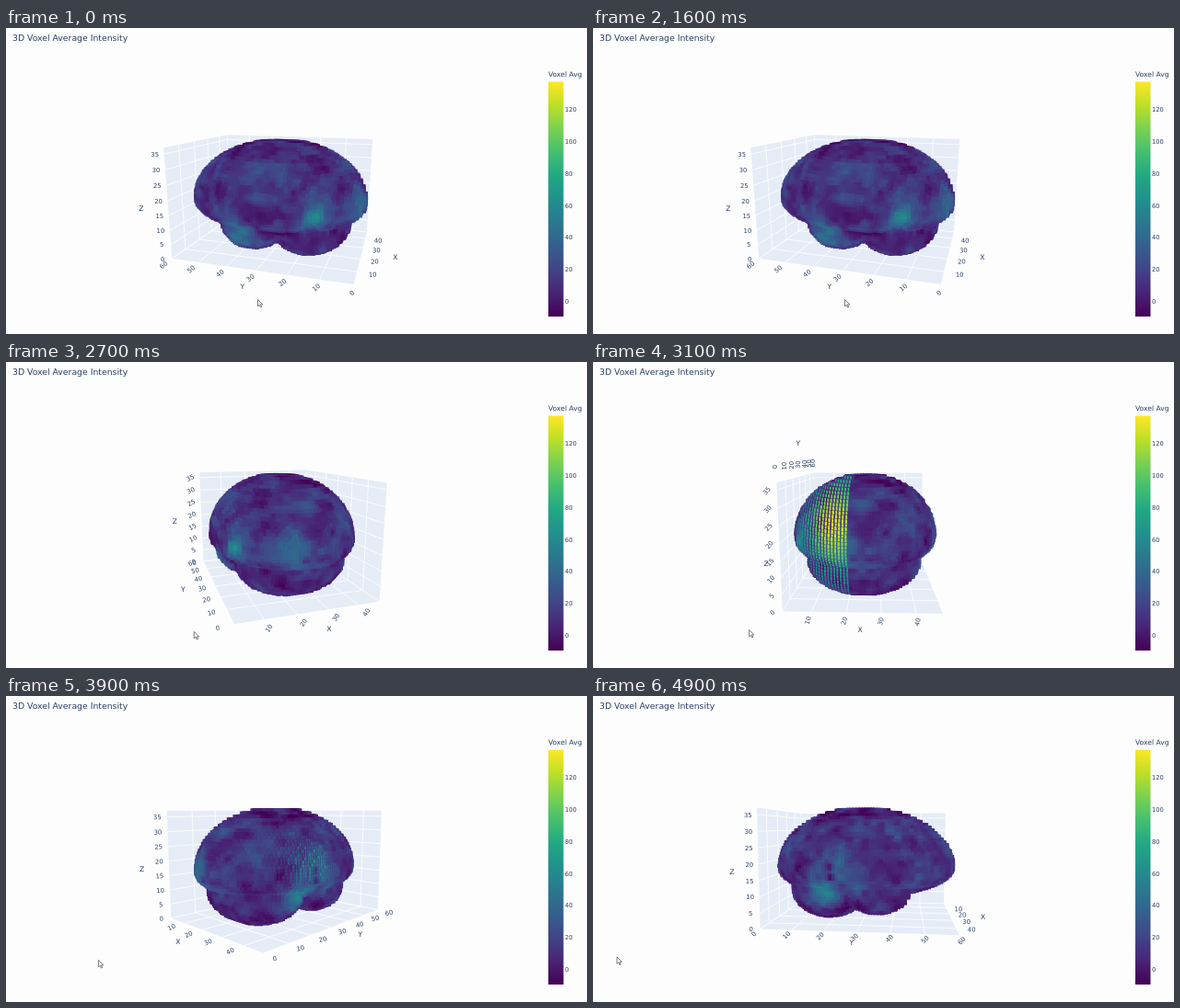
Recreate the animation shown at these times as an HTML page with a canvas. Size 631 px wide and 333 px high, loop 5 s.

```html
<!DOCTYPE html>
<html lang="en">
<head>
<meta charset="utf-8">
<title>3D Voxel Average Intensity</title>
<style>
  html, body { margin: 0; width: 100%; height: 100%; overflow: hidden; background: #fdfdfe; }
  #stage { position: relative; width: 631px; height: 333px; overflow: hidden; }
  canvas, svg { position: absolute; left: 0; top: 0; }
  text { font-family: "DejaVu Sans", Verdana, sans-serif; fill: #2a3f5f; }
</style>
</head>
<body>
<div id="stage">
  <canvas id="scene" width="631" height="333"></canvas>
  <svg width="631" height="333">
    <defs><linearGradient id="scale" x1="0" y1="1" x2="0" y2="0"></linearGradient></defs>
    <text x="7" y="13.8" font-size="9.3">3D Voxel Average Intensity</text>
    <text x="589" y="53.2" font-size="7.6">Voxel Avg</text>
    <rect x="589" y="58.5" width="16.5" height="255.5" fill="url(#scale)"/>
    <g id="ticks" font-size="6.7"></g>
    <path id="cursor" d="M0 0V7.4L1.8 5.8L3 8.5L4.2 8L3 5.4H5.3Z" fill="#fff" stroke="#444" stroke-width=".7"/>
  </svg>
</div>
<script>
const ctx = document.getElementById('scene').getContext('2d');
const cursor = document.getElementById('cursor');
const SVG = 'http://www.w3.org/2000/svg';
const LOOP = 5000, STEP = 100;
const RAD = Math.PI / 180;

const bell = (x, width) => Math.exp(-((x / width) ** 2));
const progress = (t, from, to) => Math.min(1, Math.max(0, (t - from) / (to - from)));

// ---- colour scale ----
const VIRIDIS = ['440154', '482475', '414487', '355f8d', '2a788e', '21918c',
                 '22a884', '44bf70', '7ad151', 'bddf26', 'fde725'];
const rgb = hex => [0, 2, 4].map(i => parseInt(hex.slice(i, i + 2), 16));
const palette = Array.from({ length: 201 }, (_, i) => {
  const p = Math.min(i / 20, 9.999), k = Math.floor(p);
  const a = rgb(VIRIDIS[k]), b = rgb(VIRIDIS[k + 1]);
  return `rgb(${a.map((c, j) => Math.round(c + (b[j] - c) * (p - k)))})`;
});
const LOW = -9.5, HIGH = 137;
const colour = v => palette[Math.round(200 * progress(v, LOW, HIGH))];

function addNode(parent, tag, attrs, content = '') {
  const node = document.createElementNS(SVG, tag);
  for (const key in attrs) node.setAttribute(key, attrs[key]);
  node.textContent = content;
  document.getElementById(parent).append(node);
}
VIRIDIS.forEach((hex, i) => addNode('scale', 'stop', { offset: i / 10, 'stop-color': '#' + hex }));
for (let v = 0; v <= 120; v += 20)
  addNode('ticks', 'text', { x: 607, y: 300 - v * 1.74 }, String(v));

// ---- brain voxels, centred on the axes box ----
const HALF = { x: 23, y: 30, z: 18.5 };
const ball = (dx, dy, dz, rx, ry, rz) => (dx / rx) ** 2 + (dy / ry) ** 2 + (dz / rz) ** 2 <= 1;

const cerebrum = (x, y, z) => z <= 18.5 &&
  ball(x, y + 1.5, z + 1, 23.8, y < -1.5 ? 29 : 32, z < -1 ? 10 : 20.5);
const cerebellum = (x, y, z) => ball(x, y + 12, z + 8, 18, 13.5, 10.5);
const temporalLobes = (x, y, z) => ball(Math.abs(x) - 11, y - 5, z + 7, 10, 11, 8.3);
const inside = (x, y, z) => cerebrum(x, y, z) || cerebellum(x, y, z) || temporalLobes(x, y, z);

function hash(x, y, z) {
  let h = Math.imul(x, 374761393) ^ Math.imul(y, 668265263) ^ Math.imul(z, 1274126177);
  h = Math.imul(h ^ (h >>> 13), 1103515245);
  return ((h ^ (h >>> 16)) >>> 0) / 4294967296;
}
function noise(...point) {
  const cell = point.map(Math.floor);
  const f = point.map((c, i) => { const d = c - cell[i]; return d * d * (3 - 2 * d); });
  let sum = 0;
  for (let n = 0; n < 8; n++) {
    const bit = [n & 1, n >> 1 & 1, n >> 2];
    const weight = bit.reduce((w, b, i) => w * (b ? f[i] : 1 - f[i]), 1);
    sum += weight * hash(...cell.map((c, i) => c + bit[i]));
  }
  return sum;
}

const SPOTS = [
  { x: -20, y: -17, z: -1, r: 4, gain: 48 },
  { x: -6, y: -27, z: 0, r: 4.5, gain: 42 },
  { x: -18, y: 6, z: -8, r: 5, gain: 48 },
  { x: 16, y: -11, z: -8, r: 4.5, gain: 55 },
  { x: 20, y: -8, z: -1, r: 7, gain: 16 },
  { x: 23, y: -8, z: 1, r: 1.2, gain: -40 },
  { x: 23, y: -8, z: -2, r: 1.2, gain: -40 }
];

function intensity(x, y, z) {
  const layer = size => noise(x / size + 40, y / size + 40, z / size + 40);
  let v = -14 + 28 * layer(6) + 24 * layer(2.3);
  if (z < -6) v -= 8;
  for (const s of SPOTS) v += s.gain * bell(Math.hypot(x - s.x, y - s.y, z - s.z), s.r);
  return v - 8 * bell(z - 18, 4);
}

function buildVoxels() {
  const found = [];
  for (let y = -31; y <= 31; y++)
    for (let z = -18.5; z <= 18.5; z++)
      for (let x = -23.5; x <= 23.5; x++) {
        if (!inside(x, y, z)) continue;
        if (inside(x - 1, y, z) && inside(x + 1, y, z) && inside(x, y - 1, z) &&
            inside(x, y + 1, z) && inside(x, y, z - 1) && inside(x, y, z + 1)) continue;
        found.push({ x, y, z, fill: colour(intensity(x, y, z)) });
      }
  return found;
}
const voxels = buildVoxels();

// ---- motion: a steady drag turns the view, then lowers it ----
const FRONT = 91.5;
const viewAngle = t => 17.5 + 168.9 * progress(t, 1680, 4900);
const viewTilt = t => 14.3 - 9 * progress(t, 2300, 4600);
const cursorX = t => 273.5 - 247.5 * progress(t, 1900, 4760);
const cursorY = t => 295.5 - 11.5 * progress(t, 2300, 4600);

const labelTurn = {
  x: angle => -75 * bell(angle - FRONT, 40),
  y: angle => {
    if (Math.abs(angle - 90) < 10) return -90;
    const side = angle % 180;
    return side < 90 ? side / 2 - 48 : 2 * side - 280;
  },
  z: angle => -50 * bell(angle - FRONT, 25)
};

// ---- camera ----
const FOCUS = 406, DISTANCE = 132.6, CX = 296, CY = 182;

function makeCamera(angle, tilt) {
  const s = Math.sin(angle * RAD), c = Math.cos(angle * RAD);
  const st = Math.sin(tilt * RAD), ct = Math.cos(tilt * RAD);
  return p => {
    const near = -c * p.x - s * p.y;
    const scale = FOCUS / (DISTANCE - near * ct - p.z * st);
    return { x: CX + (s * p.x - c * p.y) * scale, y: CY + (near * st - p.z * ct) * scale, scale };
  };
}

// ---- axes ----
const range = (from, to, step) => Array.from({ length: (to - from) / step + 1 }, (_, i) => from + i * step);
const AXES = {
  x: { ticks: range(10, 40, 10), origin: 24.5 },
  y: { ticks: range(0, 60, 10), origin: 30 },
  z: { ticks: range(0, 35, 5), origin: 18.5 }
};

function strokePath(points) {
  ctx.beginPath();
  points.forEach(p => ctx.lineTo(p.x, p.y));
}

function drawWall(project, fixed, at, a, b) {
  const point = (u, v) => project({ [fixed]: at, [a]: u, [b]: v });
  const A = HALF[a], B = HALF[b];
  strokePath([point(-A, -B), point(A, -B), point(A, B), point(-A, B)]);
  ctx.fillStyle = '#e5ecf6';
  ctx.fill();
  ctx.strokeStyle = '#fff';
  ctx.lineWidth = .8;
  for (const t of AXES[a].ticks) {
    const u = t - AXES[a].origin;
    strokePath([point(u, -B), point(u, B)]);
    ctx.stroke();
  }
  for (const t of AXES[b].ticks) {
    const v = t - AXES[b].origin;
    strokePath([point(-A, v), point(A, v)]);
    ctx.stroke();
  }
}

function label(text, x, y, size, turn = 0) {
  ctx.save();
  ctx.translate(x, y);
  ctx.rotate(turn * RAD);
  ctx.font = `${size}px "DejaVu Sans", Verdana, sans-serif`;
  ctx.fillStyle = '#2a3f5f';
  ctx.textAlign = 'center';
  ctx.textBaseline = 'middle';
  ctx.fillText(text, 0, 0);
  ctx.restore();
}

// Labels run along one edge; `place` gives the 3D spot for a value and an outward gap.
function drawAxis(project, angle, name, place, tickShift = [0, 1.5], titleShift = [0, 0]) {
  const { ticks, origin } = AXES[name];
  const turn = labelTurn[name](angle);
  for (const tick of ticks) {
    const p = project(place(tick - origin, 4.6));
    label(tick, p.x + tickShift[0], p.y + tickShift[1], 6.8, turn);
  }
  const p = project(place(0, 11));
  label(name.toUpperCase(), p.x + titleShift[0], p.y + titleShift[1], 7.6);
}

function drawAxes(project, angle) {
  const backX = angle < 90 ? HALF.x : -HALF.x;
  const backY = angle < 180 ? HALF.y : -HALF.y;
  drawWall(project, 'z', -HALF.z, 'x', 'y');
  drawWall(project, 'x', backX, 'y', 'z');
  drawWall(project, 'y', backY, 'x', 'z');

  const outX = -Math.sign(backX), outY = -Math.sign(backY);
  drawAxis(project, angle, 'x', (x, gap) => ({ x, y: -backY + outY * gap, z: -HALF.z }));
  const faceOn = Math.abs(angle - 90) < 10;
  drawAxis(project, angle, 'y', (y, gap) => faceOn
    ? { x: backX, y, z: HALF.z + gap }
    : { x: -backX + outX * gap, y, z: -HALF.z });

  const edges = [{ x: backX, y: -backY }, { x: -backX, y: backY }];
  const [left] = edges.sort((a, b) => project({ ...a, z: 0 }).x - project({ ...b, z: 0 }).x);
  drawAxis(project, angle, 'z', z => ({ ...left, z }), [-10, 1], [faceOn ? -14 : -29, faceOn ? 16 : 4]);
}

// ---- brain ----
// Inner voxels shine through the gaps when the view lines up with the grid.
function shine(p, angle) {
  const front = bell(angle - FRONT, 11), side = bell(angle - 132.5, 16);
  if (front > .03 && p.x < -3.5 && p.y < 2) {
    const core = Math.exp(-((p.x + 8) ** 2) / 75 - ((p.z - 6) ** 2) / 150);
    return { alpha: front, value: 48 + 85 * core };
  }
  if (side > .03 && p.x > 5 && p.y < 12) {
    const core = Math.exp(-((p.y + 8) ** 2) / 100 - ((p.z - 3) ** 2) / 60);
    return { alpha: .8 * side * core, value: 38 + 35 * core };
  }
  return null;
}

function drawBrain(project, angle) {
  const dots = voxels.map(p => ({ p, s: project(p) })).sort((a, b) => a.s.scale - b.s.scale);
  for (const { p, s } of dots) {
    const size = s.scale * 1.4;
    ctx.fillStyle = p.fill;
    ctx.fillRect(s.x - size / 2, s.y - size / 2, size, size);
    const light = shine(p, angle);
    if (!light || light.alpha < .04) continue;
    ctx.globalAlpha = light.alpha;
    ctx.fillStyle = colour(light.value);
    ctx.fillRect(s.x - size * .22, s.y - size * .42, size * .44, size * .84);
    ctx.globalAlpha = 1;
  }
}

function render(t) {
  const angle = viewAngle(t);
  const project = makeCamera(angle, viewTilt(t));
  ctx.clearRect(0, 0, 631, 333);
  drawAxes(project, angle);
  drawBrain(project, angle);
  cursor.setAttribute('transform', `translate(${cursorX(t)} ${cursorY(t)})`);
}

const start = performance.now();
let shown = -1;
function tick() {
  const elapsed = (performance.now() - start) % LOOP;
  const t = Math.floor(elapsed / STEP) * STEP;
  if (t !== shown) render(shown = t);
  requestAnimationFrame(tick);
}
tick();
</script>
</body>
</html>
```
